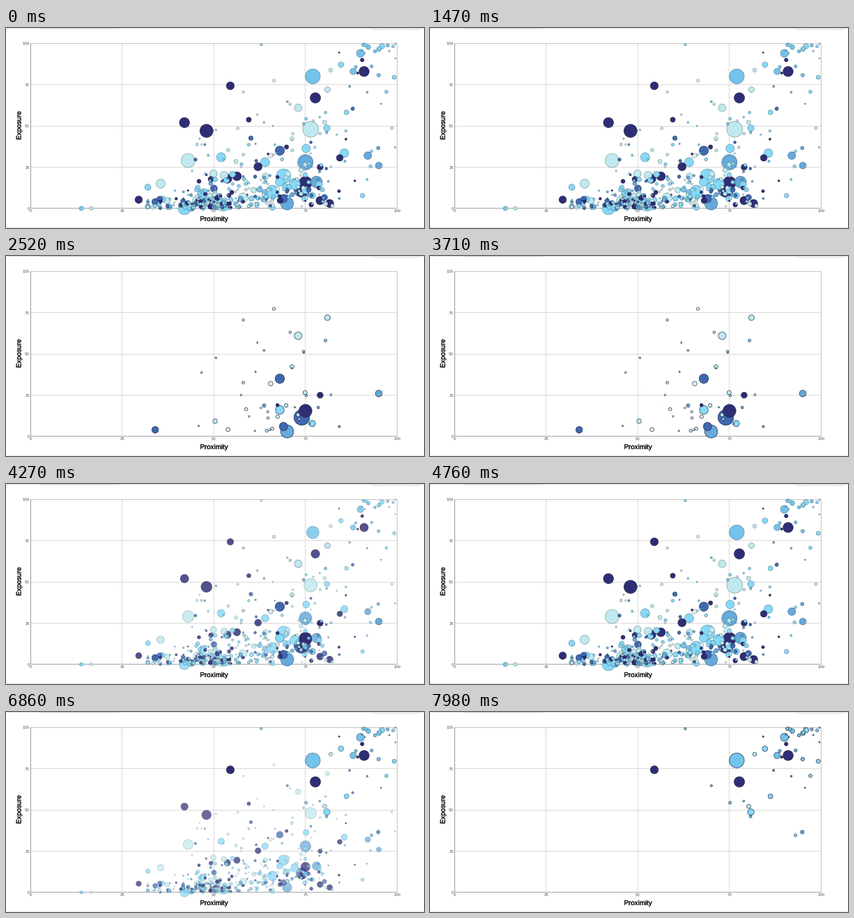
Animation of 600x288 px, one loop 8 s. Source, as a matplotlib script:

```python
import numpy as np
import matplotlib.pyplot as plt
from matplotlib.animation import FuncAnimation
from matplotlib.colors import to_rgba_array
from matplotlib.patheffects import withStroke

W, H, DPI = 600, 288, 100
PT = 72 / DPI
LOOP, STEP = 8000, 40
FADE = 1400

NAVY, ROYAL, BLUE, SKY, CYAN, TEAL, PALE = (
    "#2f2d74", "#4068b0", "#66a9db", "#74c3ec", "#86d9f8", "#bfe9ee",
    "#e0eff3")
MIXED = [CYAN] * 8 + [TEAL] * 4 + [NAVY] * 3 + [ROYAL] * 2 + [BLUE] * 2 + [SKY]
LIGHT = [CYAN] * 3 + [PALE] * 6 + [TEAL] * 3 + [BLUE] * 2 + [NAVY]
BRIGHT = [CYAN] * 6 + [SKY] * 3 + [TEAL, PALE, NAVY, BLUE]

REST, LOW, HIGH = 0, 1, 2
rng = np.random.default_rng(11)
bubbles = []


def add(group, color, *items):
    """Each item is (proximity, exposure, radius in px)."""
    bubbles.extend((x, y, r, color, group) for x, y, r in items)


def cloud(group, colors, xs, ys, size):
    """Small bubbles with radii spread around a mean size."""
    for x, y in zip(xs, ys):
        r = max(1, rng.gamma(4, size / 4))
        add(group, str(rng.choice(colors)), (min(x, 100), max(y, 0), r))


# the large bubbles
add(LOW, NAVY, (75, 15.5, 9.3), (79, 25, 4.3))
add(LOW, ROYAL, (68, 35, 6.7), (69, 6, 6), (34, 4, 4.8), (74, 11.5, 11.2))
add(LOW, BLUE, (70, 3, 9.4), (95, 26, 4.8))
add(LOW, CYAN, (68, 16, 6.2))
add(LOW, TEAL, (73, 61, 5.4), (81, 72, 4))
add(HIGH, NAVY, (54.5, 74.3, 5.7), (77.7, 67, 7.5), (91, 83, 7.3))
add(HIGH, SKY, (77, 80, 10.7), (88, 83, 4.5), (90, 94, 5.7))
add(REST, NAVY, (42, 52, 7.3), (48, 47, 9.5), (29.5, 5.3, 5.3),
    (53.7, 18, 6.5), (56.3, 19.5, 6.4), (74, 10, 7), (79, 4.8, 6),
    (81.6, 3, 5.8))
add(REST, BLUE, (75, 28, 11), (92, 32, 5.5), (78, 16, 8.4))
add(REST, CYAN, (69, 19.5, 10.5), (66, 10, 9.6), (52, 31, 6.5), (64, 28, 6.4),
    (47, 9, 6.7), (42, 0, 9), (85.6, 33.5, 6.2), (75, 11, 5.2))
add(REST, TEAL, (43, 29, 10), (76.4, 48, 11.4), (35.5, 15, 6.5),
    (49.9, 21, 5.5), (58, 6.5, 6.8))

# small bubbles kept by the first and by the second filter
cloud(LOW, LIGHT, rng.normal(67, 11, 42), rng.triangular(0, 8, 82, 42), 1.9)
cloud(HIGH, BRIGHT, 100 - rng.exponential(9, 30),
      100 - rng.exponential(13, 30), 2)
cloud(HIGH, BRIGHT, rng.uniform(70, 98, 8), rng.uniform(35, 66, 8), 2)

# dense strip along the axis, then the looser areas above and to the right
cloud(REST, MIXED, np.clip(rng.normal(48, 8.5, 165), 32, 66),
      rng.gamma(1.5, 2, 165), 2.5)
cloud(REST, MIXED, rng.uniform(45, 66, 48), rng.uniform(4, 21, 48), 2.3)
cloud(REST, MIXED, rng.uniform(62, 83, 58), rng.gamma(2.2, 4.5, 58), 2.6)
cloud(REST, MIXED, rng.uniform(41, 86, 36), rng.triangular(20, 28, 66, 36), 2.1)
cloud(REST, MIXED, rng.uniform(83, 100, 11), rng.uniform(4, 62, 11), 1.6)
cloud(REST, [CYAN, TEAL], rng.uniform(13, 17, 3), np.zeros(3), 2)

bubbles.sort(key=lambda b: -b[2])


def px(x):
    return 35.2 + 5.262 * np.asarray(x)


def py(y):
    return 259.8 - 2.376 * np.asarray(y)


fig = plt.figure(figsize=(W / DPI, H / DPI), dpi=DPI, facecolor="white")
ax = fig.add_axes([0, 0, 1, 1])
ax.set(xlim=(0, W), ylim=(H, 0))
ax.axis("off")


def line(xs, ys, color):
    """One-pixel line through pixel centres."""
    ax.plot(np.floor(xs) + 0.5, np.floor(ys) + 0.5, color=color, lw=PT,
            zorder=1, snap=False, solid_capstyle="projecting")


def label(x, y, text, size, color="#555555", **kw):
    return ax.text(x, y, text, fontsize=size * PT, color=color,
                   family="Liberation Sans",
                   **{"ha": "center", "va": "center", **kw})


def title(x, y, text, **kw):
    ink = "#1c1c1c"
    label(x, y, text, 9.8, ink, **kw).set_path_effects(
        [withStroke(linewidth=0.25, foreground=ink)])


# page edges
line([0, W], [0, 0], "#e2e2e2")
line([47, 161], [0, 0], "#c8c8c8")
line([0, W], [287, 287], "#e6e6e6")
for i in range(4):
    line([523 + 3 * i, 596 - 3 * i], [1 + i] * 2, str(0.93 + 0.018 * i))

# grid and axes
for v in (25, 50, 75, 100):
    shade = "#c4c4c4" if v == 100 else "#dadada"
    line([px(v)] * 2, [py(0), py(100)], shade)
    line([px(0), px(100)], [py(v)] * 2, shade)
line([px(0)] * 2, [py(0), py(100)], "#9a9a9a")
line([px(0), px(100)], [py(0)] * 2, "#a6a6a6")
for v in range(0, 101, 25):
    label(px(v), 263.5, str(v), 6.2)
    label(34, py(v) + 0.3, str(v), 6.2, ha="right", va="center_baseline")
title(298.3, 275, "Proximity")
title(18.5, 140.5, "Exposure", rotation=90)

X, Y, R = np.array([b[:3] for b in bubbles]).T
group = np.array([b[4] for b in bubbles])
fill = to_rgba_array([b[3] for b in bubbles])
soft = fill * (0.55, 0.55, 0.55, 0.75)
dark = np.array([0.1, 0.15, 0.25, 0.95])
dots = ax.scatter(px(X), py(Y), s=1, zorder=3)


def ease(u):
    u = min(max(u, 0), 1)
    return 4 * u ** 3 if u < 0.5 else 1 - 4 * (1 - u) ** 3


def draw(i):
    t = i * STEP
    low = ease((t - 1400) / FADE) - ease((t - 3330) / FADE)
    high = ease((t - 6260) / FADE)
    shown = np.array([1 - low - high, 1 - high, 1 - low])[group]
    focus = np.array([0, low, high])[group][:, None]
    fill[:, 3] = shown
    # outlines of the kept bubbles darken while a filter is on
    edge = soft + (dark - soft) * focus
    edge[:, 3] *= shown
    dots.set_sizes((2 * R * shown * PT) ** 2)
    dots.set_facecolors(fill)
    dots.set_edgecolors(edge)
    dots.set_linewidths(0.7 * PT * shown)
    return dots,


anim = FuncAnimation(fig, draw, frames=LOOP // STEP, interval=STEP,
                     repeat=True, repeat_delay=0, blit=False)
plt.show()
```
